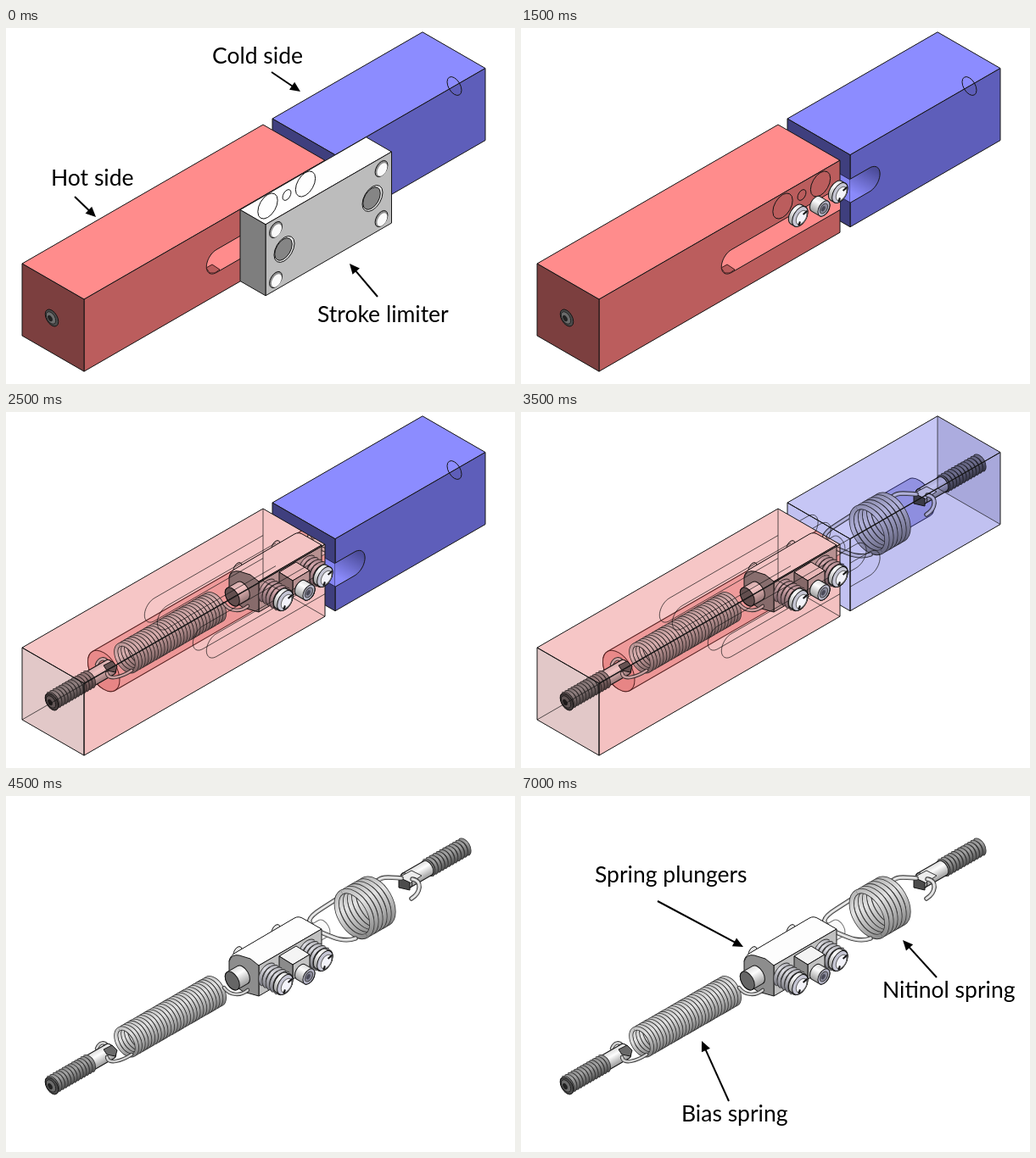
These frames come from a looping animation (600 by 420 pixels, 8000 ms). An HTML page with a canvas:

```html
<!DOCTYPE html>
<html lang="en">
<head>
<meta charset="utf-8">
<title>Spring actuator, layer by layer</title>
<style>
  html, body { margin: 0; width: 100%; height: 100%; overflow: hidden; background: #fff; }
  canvas { display: block; width: 600px; height: 420px; }
</style>
</head>
<body>
<canvas id="stage" width="600" height="420"></canvas>
<script>
const ctx = document.getElementById('stage').getContext('2d');
const PI = Math.PI, K = Math.tan(PI / 6), TILT = PI / 6;
const INK = '#151515';

// ---------- basic shapes ----------
function trace(pts, closed = true) {
  ctx.beginPath();
  pts.forEach(([x, y], i) => i ? ctx.lineTo(x, y) : ctx.moveTo(x, y));
  if (closed) ctx.closePath();
}
function paint(fill, line = INK, width = 1) {
  if (fill) { ctx.fillStyle = fill; ctx.fill(); }
  if (line) { ctx.strokeStyle = line; ctx.lineWidth = width; ctx.stroke(); }
}
function poly(pts, fill, line) { trace(pts); paint(fill, line); }
function disc(x, y, r, rot, fill, line) {
  ctx.beginPath();
  ctx.ellipse(x, y, r * K, r, rot, 0, 2 * PI);
  paint(fill, line);
}
function wire(d, width) {
  const p = new Path2D(d);
  ctx.lineCap = 'round';
  for (const [c, w] of [['#333', width], ['#bdbdbd', width - 1.8], ['#efefef', width - 4]]) {
    ctx.strokeStyle = c;
    ctx.lineWidth = Math.max(w, 0.8);
    ctx.stroke(p);
  }
  ctx.lineCap = 'butt';
}

// ---------- isometric boxes ----------
const RED = { x: 19, y: 278, len: 284, depth: 73, h: 85 };
const BLUE = { x: 314, y: 107, len: 177, depth: 74, h: 85 };
const LIMITER = { x: 276, y: 214.5, len: 148.5, depth: 30, h: 84 };

const corner = (b, i, j, k) =>
  [b.x + i * b.len + j * b.depth, b.y + (j * b.depth - i * b.len) * K + k * b.h];
const face = (b, list) => list.split(' ').map(s => corner(b, +s[0], +s[1], +s[2]));
const TOP = '000 100 110 010', RIGHT = '010 110 111 011', LEFT = '000 010 011 001';
const END = '100 110 111 101', OUTLINE = '000 100 110 111 011 001';

function solid(b, top, right, left) {
  poly(face(b, TOP), top);
  poly(face(b, RIGHT), right);
  poly(face(b, LEFT), left);
}

// Slot with one round end at (x, y); it opens len px to the side
function slotPts(x, y, len, r) {
  const d = Math.sign(len), fx = x + len, fy = y - len * K;
  const pts = [[fx, fy + d * r]];
  for (let i = 0; i <= 20; i++) {
    const a = d * PI / 2 + PI * i / 20;
    pts.push([x + r * 0.866 * Math.cos(a), y + r * (Math.sin(a) - 0.5 * Math.cos(a))]);
  }
  pts.push([fx, fy - d * r]);
  return pts;
}
function slot(x, y, len, r, fill) {
  trace(slotPts(x, y, len, r), false);
  paint(fill);
}

// ---------- round parts; local x runs away from the visible end ----------
function along(x, y, rot, flip, draw) {
  ctx.save();
  ctx.translate(x, y);
  ctx.rotate(rot);
  if (flip) ctx.scale(-1, 1);
  draw();
  ctx.restore();
}
const onAxis = (draw, drop = 0) =>
  along(52 + drop * 0.5, 342 + drop * 0.866, -TILT, false, draw);

function shade(r, top, mid, low) {
  const g = ctx.createLinearGradient(0, -r, 0, r);
  g.addColorStop(0, top);
  g.addColorStop(0.35, mid);
  g.addColorStop(1, low);
  return g;
}
function tube(s0, s1, r, fill, cap, line = INK) {
  ctx.beginPath();
  ctx.ellipse(s1, 0, r * K, r, 0, -PI / 2, PI / 2);
  ctx.ellipse(s0, 0, r * K, r, 0, PI / 2, 1.5 * PI);
  ctx.closePath();
  paint(fill, line);
  if (cap) disc(s0, 0, r, 0, cap, line);
}
function coil(s0, s1, n, r, w, colour, hollow = true) {
  for (const start of hollow ? [PI / 2, -PI / 2] : [-PI / 2]) {
    for (let i = n - 1; i >= 0; i--) {
      ctx.beginPath();
      ctx.ellipse(s0 + (s1 - s0) * i / (n - 1), 0, r * K, r, 0, start, start + PI);
      paint(null, '#333', w);
      paint(null, colour, w - 1.6);
    }
  }
}
function thread(s0, s1, r) {
  tube(s0, s1, r, '#444', null, '#333');
  coil(s0, s1, Math.round((s1 - s0) / 4), r - 1, 4.6, shade(r, '#8c8c8c', '#a4a4a4', '#505050'), false);
}
const steel = r => shade(r, '#dcdcdc', '#fdfdfd', '#9a9a9a');

// ---------- inner mechanism ----------
function plunger(x, y, depth) {
  along(x, y, TILT, true, () => {
    if (depth > 8) {
      tube(0, depth, 14, '#777', null, '#333');
      coil(2, depth, Math.round(depth / 4.6), 13, 5, shade(14, '#b0b0b6', '#e0e0e6', '#7c7c84'), false);
    }
    tube(-1, 4, 13, steel(13), '#c6c6d4');
    disc(-3, 0, 9, 0, '#f3f3fa', '#666');
    ctx.beginPath();
    ctx.moveTo(-5, -10);
    ctx.lineTo(-3, -4);
    ctx.moveTo(-5, 10);
    ctx.lineTo(-4, 5);
    paint(null, INK, 2);
  });
}
function bolt() {
  along(357, 213, TILT, true, () => {
    tube(0, 11, 10, steel(10), '#b8b8ca');
    disc(0, 0, 6.5, 0, '#8a8a9c', '#444');
    disc(0.5, 0.5, 3.5, 0, '#4a4a58', null);
  });
}
function screws(depth) {
  plunger(375, 194, depth);
  if (depth > 8) {
    poly([[322, 189], [342, 177], [358, 187], [338, 199]], '#f4f4f4');
    poly([[338, 199], [358, 187], [358, 206], [338, 216]], '#c2c2c2');
    poly([[322, 189], [338, 199], [338, 216], [322, 206]], '#8b8b8b');
  }
  bolt();
  plunger(328, 222, depth);
}
function rodEnd() {
  disc(54, 342, 11, -TILT, '#4a4a4a');
  disc(53, 342, 8, -TILT, '#6c6c6c', '#222');
  disc(52, 342.5, 4, -TILT, '#222', null);
}
function block() {
  disc(273, 184, 7, TILT, '#e6e6e6');
  disc(318, 158, 7, TILT, '#e6e6e6');
  ctx.beginPath();
  ctx.moveTo(263, 195);
  ctx.quadraticCurveTo(264, 188, 272, 184);
  ctx.lineTo(340, 144);
  ctx.quadraticCurveTo(345, 141, 351, 145);
  ctx.lineTo(372, 157);
  ctx.lineTo(298, 200);
  ctx.closePath();
  paint('#fdfdfd');
  poly([[298, 200], [372, 157], [372, 193], [298, 236]], '#c0c0c0');
  ctx.beginPath();
  ctx.moveTo(263, 195);
  ctx.quadraticCurveTo(266, 186, 275, 188);
  ctx.lineTo(288, 192);
  ctx.lineTo(298, 200);
  ctx.lineTo(298, 236);
  ctx.lineTo(280, 231);
  ctx.quadraticCurveTo(263, 222, 263, 206);
  ctx.closePath();
  paint('#8d8d8d');
}
function mechanism() {
  onAxis(() => {
    thread(514, 563, 10.5);
    tube(485, 514, 9.5, steel(9.5), '#b4b4b4');
  });
  poly([[463, 96], [478, 88], [490, 94], [476, 103]], '#ececec', '#333');
  poly([[463, 96], [476, 102], [476, 111], [463, 108]], '#4c4c4c');
  wire('M479 98 C491 100 489 114 478 121', 5.5);
  wire('M436 102 C442 94 452 96 466 97', 5.5);

  wire('M372 156 C350 152 356 143 372 133 L400 115', 5.5);
  onAxis(() => coil(412, 441, 6, 29.5, 6.2, shade(32, '#b4b4b4', '#e4e4e4', '#858585')), 3.5);
  onAxis(() => tube(352, 372, 11, '#fafafa', null, '#777'));
  wire('M372 161 C386 167 398 173 412 168', 5.5);

  block();
  screws(22);

  onAxis(() => tube(248, 262, 12, steel(12), '#666'));
  onAxis(() => coil(104, 223, 28, 17.5, 5, shade(19, '#c0c0c0', '#e2e2e2', '#7c7c7c')));
  wire('M257 226 C264 236 277 236 285 229', 4.5);

  wire('M107 298 C110 290 117 289 120 296', 4.5);
  onAxis(() => {
    tube(50, 82, 9.5, steel(9.5));
    thread(2, 52, 10.5);
  });
  poly([[115, 299], [125, 294], [131, 300], [129, 307], [119, 305]], '#6a6a6a');
  wire('M119 308 C120 317 136 313 148 305', 4.5);
  rodEnd();
}

// ---------- whole bodies ----------
function blueBody() {
  solid(BLUE, '#8c8cff', '#5e5eba', '#3f3f7e');
  disc(528.5, 68.5, 12, -TILT, null);
  poly([[375, 171.5], [388, 179], [388, 206], [375, 198.5]], '#8484f2', '#22224c');
  const wall = ctx.createLinearGradient(396, 197, 414, 165);
  wall.addColorStop(0, '#8a8afa');
  wall.addColorStop(1, '#4c4c9a');
  slot(411, 179, -23, 14, wall);
}
function redBody() {
  solid(RED, '#ff8c8c', '#bb5d5d', '#7c3f3f');
  slot(248, 275, 128, 13.5, '#ff8c8c');
  poly([[236, 283], [243, 279], [252, 285], [246, 289], [240, 289]], '#b95c5c', '#401c1c');
  rodEnd();
}
function portHoles() {
  for (const [x, y, r] of [[308.5, 210, 16.5], [331, 197, 7], [353, 184, 16.5]]) disc(x, y, r, TILT, null);
}
function limiter() {
  solid(LIMITER, '#fefefe', '#bcbcbc', '#7e7e7e');
  for (const [x, y] of [[318, 238], [318, 297], [442.5, 166], [442.5, 225]]) {
    disc(x, y, 10.5, TILT, '#8f8f8f');
    disc(x + 1, y + 1, 8.5, TILT, '#fafafa', null);
  }
  for (const [x, y] of [[328, 261], [432, 201]]) {
    disc(x, y, 17, TILT, '#e4e4e4');
    disc(x - 1, y, 14.5, TILT, '#858585');
  }
}

// See-through housing: inner parts tinted by the faces in front of them
function ghost(b, tint, inside, slots) {
  const [top, right, left, end] = tint;
  ctx.save();
  trace(face(b, OUTLINE));
  ctx.clip();
  ctx.fillStyle = '#fff';
  ctx.fill();
  inside();
  mechanism();
  ctx.globalCompositeOperation = 'multiply';
  poly(face(b, TOP), top, null);
  poly(face(b, RIGHT), right, null);
  poly(face(b, LEFT), left, null);
  if (end) poly(face(b, END), end, null);
  ctx.restore();
  ctx.save();
  ctx.globalAlpha = 0.7;
  for (const s of slots) slot(...s);
  trace(face(b, '001 101 111'), false);
  paint(null);
  trace(face(b, '100 101'), false);
  paint(null);
  ctx.restore();
  for (const f of [TOP, RIGHT, LEFT]) poly(face(b, f), null);
}
function redGhost() {
  ghost(RED, ['#f6c6c6', '#f4c1c1', '#e2c8c8'], () => onAxis(() => {
    tube(73, 372, 26.5, '#f8c8c8', '#f2b0b0', '#5a2c2c');
  }), [[248, 275], [232, 266], [190, 242], [175, 233]].map(([x, y]) => [x, y, 128, 13.5]));
  screws(5);
}
function blueGhost() {
  ghost(BLUE, ['#c6c6f5', '#c1c1f1', '#c1c1f1', '#dedee8'], () => onAxis(() => {
    tube(425, 482, 25, '#bcbcec', null, '#2c2c5a');
  }), [[411, 179], [395, 170], [353, 146], [338, 137]].map(([x, y]) => [x, y, -23, 14]));
}

// ---------- labels ----------
function label(text, x, y, x0, y0, x1, y1) {
  ctx.fillStyle = '#000';
  ctx.font = '26.5px Lato, sans-serif';
  ctx.fillText(text, x, y);
  const a = Math.atan2(y1 - y0, x1 - x0);
  trace([[x0, y0], [x1 - 8 * Math.cos(a), y1 - 8 * Math.sin(a)]], false);
  paint(null, '#000', 2);
  along(x1, y1, a, false, () => poly([[0, 0], [-12, -5.5], [-12, 5.5]], '#000', null));
}

// ---------- scenes ----------
function covered() { blueBody(); redBody(); limiter(); portHoles(); }
function labelled() {
  covered();
  label('Cold side', 243, 42, 313, 52, 347, 75);
  label('Hot side', 53, 186, 81, 199, 106, 223);
  label('Stroke limiter', 367, 347, 438, 317, 405, 278);
}
function uncovered() { blueBody(); redBody(); portHoles(); screws(5); }
function redClear() { blueBody(); redGhost(); }
function bothClear() { blueGhost(); redGhost(); }
function named() {
  mechanism();
  label('Spring plungers', 87, 102, 161, 124, 262, 178);
  label('Nitinol spring', 426, 238, 490, 214, 450, 170);
  label('Bias spring', 189, 384, 245, 360, 213, 289);
}

const LOOP = 8000;
const scenes = [
  [0, labelled], [500, covered], [1500, uncovered], [2500, redClear],
  [3500, bothClear], [4500, mechanism], [5500, named]
];
const begin = performance.now();

function tick() {
  const t = (performance.now() - begin) % LOOP;
  const [, draw] = scenes.findLast(([at]) => t >= at);
  ctx.fillStyle = '#fff';
  ctx.fillRect(0, 0, 600, 420);
  ctx.lineJoin = 'round';
  draw();
  requestAnimationFrame(tick);
}
tick();
</script>
</body>
</html>
```
